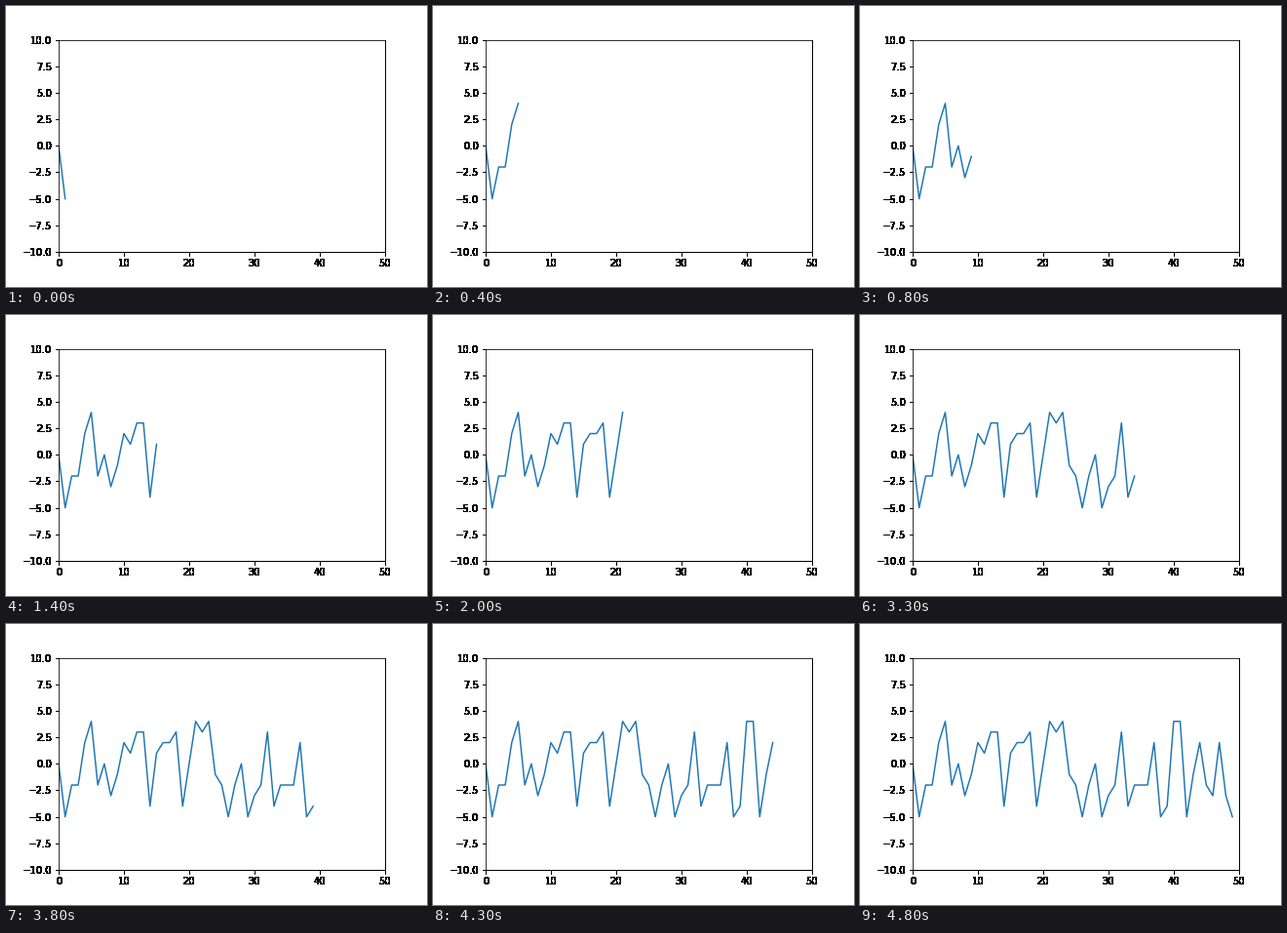
These frames come from a looping animation (432 by 288 pixels, 4.9 s). A matplotlib script:

```python
import numpy as np
import matplotlib.pyplot as plt
from matplotlib.animation import FuncAnimation

N = 50

np.random.seed(0)
x = np.arange(N)
y = np.random.randint(-5, 5, N)


def harden(img, dpi):
    """Make every touched pixel opaque, so edges are not smoothed."""
    img[..., 3] = img[..., 3] > 0
    return img, 0, 0


fig, ax = plt.subplots(figsize=(6, 4), dpi=72)
fig.subplots_adjust(bottom=0.125)
ax.set_xlim(0, 50)
ax.set_ylim(-10, 10)
for part in (ax.xaxis, ax.yaxis, ax.spines["bottom"], ax.spines["right"]):
    part.set_agg_filter(harden)

line, = ax.plot([], [], lw=1.5, color="C0")


def update(i):
    line.set_data(x[:i + 2], y[:i + 2])
    return line,


anim = FuncAnimation(fig, update, frames=N - 1, interval=100,
                     repeat=True, repeat_delay=0)
plt.show()
```
